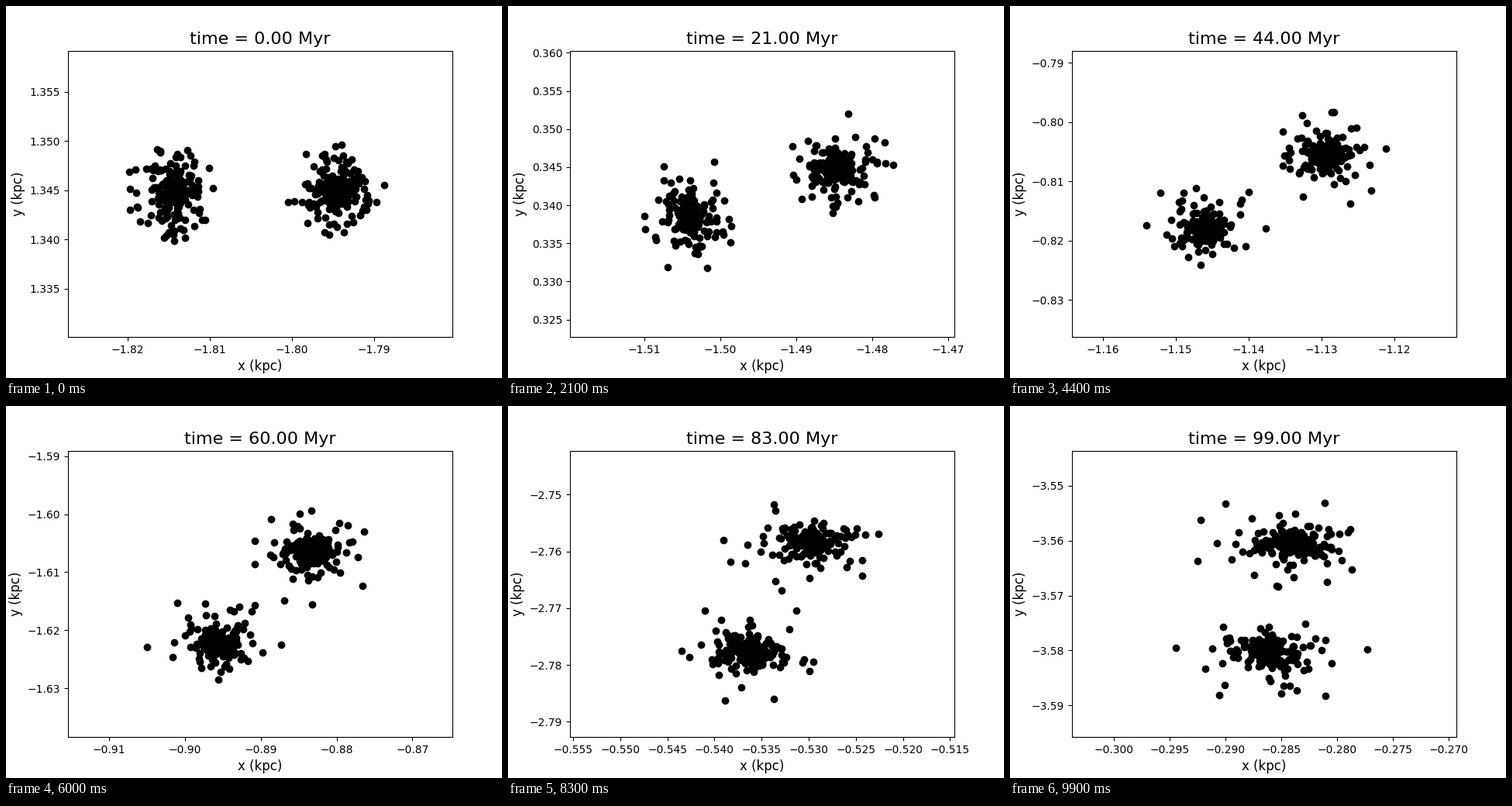
A matplotlib script that plays this animation: 640x480 px, repeating every 10000 ms.

```python
import numpy as np
import matplotlib.pyplot as plt
from matplotlib.animation import FuncAnimation

FRAMES = 100
PC = 1e-3  # kpc

# Uniform drift of the pair's centre of mass (kpc, kpc / Myr)
START = np.array([-1.80448, 1.34476])
DRIFT = np.array([0.015505, -0.050155])

# Mutual orbit of the two clusters (pc, rad / Myr)
SEPARATION = 20.2
TURN = np.radians(0.853)

# View: time (Myr), shift from the centre of mass x, y, half size x, y (pc)
VIEW = np.array([
    [0, 0.615, -0.11, 23.4, 14.55],
    [21, -0.11, -0.165, 25.3, 18.8],
    [44, -0.11, -0.205, 26.4, 24.13],
    [60, -0.39, 0.655, 25.35, 24.7],
    [75, -1.155, 0.045, 22.65, 24.75],
    [91, -2.58, 0.91, 18.15, 25.7],
    [99, -1.545, 0.73, 17.25, 26.05],
])


class Cluster:
    """Bound stars on ellipses plus a few that drift outwards."""

    def __init__(self, rng, bound=185, loose=15, reach=6.8):
        size = rng.uniform(0.5, 2.7, (bound, 1))
        axes = rng.normal(0, 1, (2, bound, 2)) * size
        norm = np.sqrt((axes**2).sum(axis=(0, 2)))[:, None]
        limit = reach * rng.uniform(0.75, 1, (bound, 1))
        self.a, self.b = axes * np.minimum(1, limit / norm)
        self.rate = 0.32 / np.sqrt(1 + (size / 1.5) ** 2)

        self.near = rng.uniform(3, 5, loose)
        self.far = rng.uniform(4.5, 9.5, loose)
        self.phase = rng.uniform(0, 2 * np.pi, loose)
        self.swing = rng.choice([-1, 1], loose) * 0.16 / np.sqrt(self.far)

    def at(self, t):
        bound = (self.a * np.cos(self.rate * t)
                 + self.b * np.sin(self.rate * t))
        r = self.far + (self.near - self.far) * np.exp(-t / 18)
        angle = self.phase + self.swing * t
        loose = np.column_stack([r * np.cos(angle), r * np.sin(angle)])
        return np.concatenate([bound, loose])


rng = np.random.default_rng(12)
left, right = Cluster(rng), Cluster(rng)

fig, ax = plt.subplots(figsize=(6.4, 4.8), dpi=100)
dots = ax.scatter([], [], color="black")
ax.set_xlabel("x (kpc)", fontsize=12)
ax.set_ylabel("y (kpc)", fontsize=12)
title = ax.set_title("", fontsize=16)


def update(t):
    age = max(t - 1, 0)  # the first step stands still
    com = START + DRIFT * age
    angle = TURN * t
    arm = SEPARATION / 2 * np.array([np.cos(angle), np.sin(angle)])
    stars = np.concatenate([left.at(age) - arm, right.at(age) + arm])
    dots.set_offsets(com + stars * PC)

    dx, dy, w, h = (np.interp(t, VIEW[:, 0], col) * PC for col in VIEW.T[1:])
    x, y = com + [dx, dy]
    ax.set_xlim(x - w, x + w)
    ax.set_ylim(y - h, y + h)
    title.set_text(f"time = {t:.2f} Myr")
    return dots, title


anim = FuncAnimation(fig, update, frames=FRAMES, interval=100, repeat=True)
plt.show()
```
